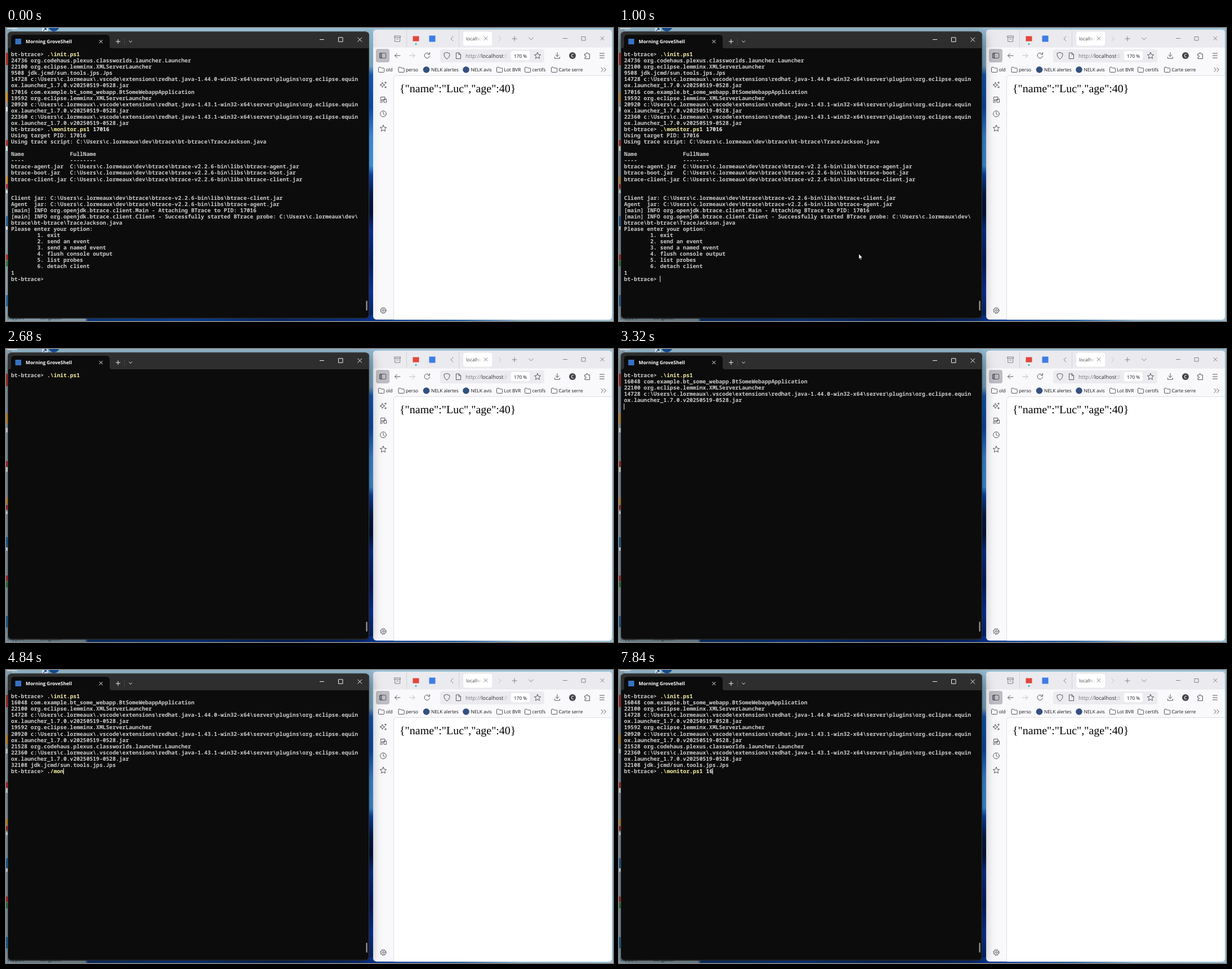
Write an HTML page that moves like this. It is 1078 by 520 pixels and loops after 8 s.

```html
<!DOCTYPE html>
<html lang="en">
<head>
<meta charset="utf-8">
<title>Terminal session</title>
<style>
  html, body { margin: 0; width: 100%; height: 100%; overflow: hidden; background: #9cc1d6; }
  svg { display: block; }
  text { text-rendering: geometricPrecision; white-space: pre; font-family: "Open Sans", "Noto Sans", sans-serif; }
  .icon { fill: none; stroke: #55555e; stroke-width: 1; stroke-linecap: round; stroke-linejoin: round; }
  .frame { stroke: #74747c; stroke-width: .9; }
  .pale { stroke: #bcbcc2; }
  .light { fill: none; stroke: #f2f2f2; stroke-width: 1; }
  .label { font-size: 8.3px; fill: #15141a; }
  #screen text { font: 600 9.708px "Noto Sans Mono", "DejaVu Sans Mono", monospace; }
  #shade { filter: drop-shadow(0 5px 11px rgba(0, 0, 0, .5)); }
</style>
</head>
<body>
<svg width="1078" height="520" viewBox="0 0 1078 520">
  <defs>
    <linearGradient id="gap" x2="0" y2="1">
      <stop offset="0" stop-color="#97bdd4"/><stop offset=".13" stop-color="#7fa9c8"/>
      <stop offset=".16" stop-color="#145bbb"/><stop offset=".27" stop-color="#0b4bb0"/>
      <stop offset=".37" stop-color="#3d8ce0"/><stop offset=".47" stop-color="#3f96e4"/>
      <stop offset=".5" stop-color="#0a46ae"/><stop offset=".57" stop-color="#061a4a"/>
      <stop offset=".63" stop-color="#04123a"/><stop offset=".69" stop-color="#0a2f96"/>
      <stop offset=".8" stop-color="#051c66"/><stop offset=".9" stop-color="#0a34a4"/>
      <stop offset="1" stop-color="#06205e"/>
    </linearGradient>
    <linearGradient id="floor">
      <stop offset="0" stop-color="#8fa7b5"/><stop offset=".13" stop-color="#8fa7b5"/>
      <stop offset=".135" stop-color="#0d3b82"/><stop offset=".3" stop-color="#0a429c"/>
      <stop offset=".45" stop-color="#082a70"/><stop offset=".6" stop-color="#0a3594"/>
      <stop offset=".75" stop-color="#2360a4"/><stop offset=".85" stop-color="#8db0c6"/>
      <stop offset="1" stop-color="#9cc1d6"/>
    </linearGradient>
    <linearGradient id="fadeTab"><stop stop-color="#fff" stop-opacity="0"/><stop offset="1" stop-color="#fff"/></linearGradient>
    <linearGradient id="fadeUrl"><stop stop-color="#ececf0" stop-opacity="0"/><stop offset="1" stop-color="#ececf0"/></linearGradient>
    <path id="star" d="M0-5.6 1.7-1.9 5.6-1.5 2.7 1.2 3.5 5.2 0 3.1-3.5 5.2-2.7 1.2-5.6-1.5-1.7-1.9Z"/>
    <path id="folder" d="M.5 1.5q0-1 1-1h2.6l1.4 1.6h4.2q1 0 1 1v5.4q0 1-1 1h-8.2q-1 0-1-1z"/>
    <path id="cross" d="M-3-3 3 3M3-3-3 3"/>
    <path id="plus" d="M-4 0H4M0-4V4"/>
    <clipPath id="urlClip"><path d="M812 38h78v24h-78z"/></clipPath>
  </defs>

  <!-- Desktop -->
  <path fill="#9cc1d6" d="M0 0h1078v520H0z"/>
  <path fill="#8ca6b7" d="M0 0h10v520H0z"/>
  <path fill="url(#gap)" d="M636 0h24v520h-24z"/>
  <path fill="url(#floor)" d="M0 510h1078v10H0z"/>
  <path fill="#c22f26" d="M0 44h3v22H0zM0 199h3v10H0zM0 277h3v8H0zM0 402h3v10H0z"/>
  <path fill="#e09a2c" d="M0 114h3v18H0zM0 264h3v12H0z"/>
  <path fill="#2c8a45" d="M0 413h3v10H0z"/>
  <path fill="#1f6fb0" d="M0 334h3v20H0zM0 474h3v20H0z"/>
  <path fill="#eef2f5" d="M0 140h3v8H0zM0 210h3v8H0zM0 288h3v5H0zM0 352h3v6H0zM64 0h10v6H64zM2 0h18v1.5H2z"/>
  <path fill="none" stroke="#1c62b5" stroke-width="1.5" d="M66 5l5-4M68 .8h3.3V4"/>
  <circle cx="85" cy="-4" r="10" fill="#15539c"/>
  <text x="2" y="517" font-size="8" fill="#1b2630">Support</text>
  <text x="61" y="517" font-size="8" fill="#1b2630">Songbook</text>

  <!-- Browser -->
  <rect x="652" y="3" width="424" height="514.5" rx="6" fill="#f9f9fb"/>
  <path fill="#eaeaef" d="M652 34.5V9q0-6 6-6h412q6 0 6 6v25.5z"/>
  <path fill="#fff" d="M689 517.5V89q0-4 4-4h383v426.5q0 6-6 6z"/>
  <path fill="none" stroke="#dedee4" d="M688.5 517V89q0-4.5 4.5-4.5h383"/>
  <path stroke="#d2d2d8" d="M711.5 4v30M804.5 4v30"/>
  <rect x="811.5" y="6" width="52.5" height="26" rx="4" fill="#fff" stroke="#dcdce2" stroke-width=".6"/>
  <text class="label" x="817" y="22" style="fill:#45454d">localho</text>
  <path fill="url(#fadeTab)" d="M834 10h11v18h-11z"/>
  <rect x="722.5" y="14.5" width="11" height="9" fill="#e2463a"/>
  <circle cx="728" cy="28.5" r="1.4" fill="#2ab39a"/>
  <rect x="751.5" y="13.5" width="11" height="11" fill="#3c7de6"/>
  <g class="icon frame">
    <path d="M690 14h10.5v2.5H690zM690.7 16.5v7.5h9v-7.5M693.5 19.5h3.5"/>
    <path d="M794 15l-4 4 4 4M928.5 17l4 4 4-4"/>
    <path class="pale" d="M875 15l4 4-4 4"/>
    <use href="#cross" x="852" y="18.5"/>
    <use href="#plus" x="903" y="19"/>
    <path d="M989.5 18.5h7M1022.5 15.5h6.5v6.5h-6.5z"/>
    <use href="#cross" x="1059" y="18.5"/>
  </g>

  <rect x="657" y="37" width="24" height="24" rx="4" fill="#bdbdc3"/>
  <rect x="771" y="38" width="185" height="23" rx="4" fill="#ececf0"/>
  <rect x="897" y="41" width="33" height="16" rx="3" fill="#fff"/>
  <g class="icon">
    <rect x="663.7" y="44.5" width="11" height="9" rx="1.5"/>
    <path fill="#8a8a92" d="M664 45.5h3v7h-3z"/>
    <path d="M700 49h-9.5M694.5 45l-4 4 4 4"/>
    <path class="pale" d="M716.5 49h9.5M722 45l4 4-4 4"/>
    <path d="M751.3 45.7a4.7 4.7 0 1 0 1.2 4M752.5 43.5v3.3h-3.3"/>
    <path d="M783 43.5l5 1.8q.3 6.7-5 9.7-5.3-3-5-9.7z"/>
    <path d="M799.8 44h4.7l3 3v7.5h-7.7zM804.3 44v3.2h3.2"/>
    <use href="#star" x="944" y="49"/>
    <path d="M979 43.5v7M976 47.7l3 3 3-3M974.5 51.5v2.5h9v-2.5"/>
    <path d="M1028 46h2.5q-.5-2.5 1.3-2.5t1.4 2.5h3.3v8.5H1028v-2.7q2.6.4 2.6-1.4T1028 49z"/>
    <path d="M1054.5 45h8M1054.5 49h8M1054.5 53h8"/>
  </g>
  <circle cx="1006" cy="49" r="6" fill="#45454d"/>
  <text x="1006" y="52" font-size="8" font-weight="600" fill="#fff" text-anchor="middle">C</text>
  <g clip-path="url(#urlClip)">
    <text x="816" y="53" font-size="9.5" fill="#333"><tspan fill="#777780">http://</tspan>localhost<tspan fill="#777780">:8</tspan></text>
  </g>
  <path fill="url(#fadeUrl)" d="M881 42h11v16h-11z"/>
  <text class="label" x="913.5" y="52.5" text-anchor="middle">170 %</text>

  <g id="bookmarks"></g>
  <path class="icon" d="M1057 70.5l3.5 3.5-3.5 3.5M1062 70.5l3.5 3.5-3.5 3.5"/>

  <g class="icon">
    <path d="M668.5 96.5l1.3 3.2 3.2 1.3-3.2 1.3-1.3 3.2-1.3-3.2L664 101l3.2-1.3zM674 95.5v3M672.5 97h3M674 103.5v3M672.5 105h3"/>
    <path d="M666 122.5h7v5h-7zM664.5 129.5h5M671.5 126h4v6h-4zM664.5 132h4"/>
    <circle cx="670" cy="152.3" r="5.3"/><path d="M670 149v3.5l2.4 1.5"/>
    <use href="#star" x="670" y="178"/>
    <circle cx="670" cy="501.3" r="1.7"/><circle cx="670" cy="501.3" r="4.3"/>
    <circle cx="670" cy="501.3" r="5.2" stroke-linecap="butt" stroke-dasharray="2.042"/>
  </g>
  <text x="699" y="113.6" font-size="20" style="font-family:'Liberation Serif',serif">{"name":"Luc","age":40}</text>

  <!-- Terminal -->
  <rect id="shade" x="3" y="6.5" width="642" height="509" rx="7" fill="#0c0c0c"/>
  <rect x="3" y="6.5" width="642" height="509" rx="7" fill="#0c0c0c"/>
  <path fill="#2e2e2e" d="M3 36V13.5q0-7 7-7h628q7 0 7 7V36z"/>
  <path fill="#0c0c0c" d="M5 36q4 0 4-4V18q0-6 6-6h163q6 0 6 6v14q0 4 4 4z"/>
  <rect x="3.5" y="7" width="641" height="508" rx="6.5" fill="none" stroke="#444" stroke-width=".8"/>
  <rect x="16.5" y="19" width="10.5" height="10" fill="#3672c4"/>
  <text x="35" y="27.2" font-size="8.4" font-weight="700" fill="#fff">Morning GroveShell</text>
  <g class="light">
    <use href="#cross" x="168.5" y="24"/>
    <use href="#plus" x="199" y="24"/>
    <path d="M218.5 22.7l2.7 2.6 2.7-2.6M557 20.5h8M590.5 16.8h7.5v7.5h-7.5z"/>
    <path stroke="#454545" d="M210.5 18v12"/>
    <path d="M624.5 16.8l7.6 7.6M632.1 16.8l-7.6 7.6"/>
  </g>
  <rect x="639.5" y="484" width="2.2" height="17.5" rx="1" fill="#9c9c9c"/>
  <g id="screen" xml:space="preserve"></g>
  <rect id="caret" width="1" height="11.07" fill="#f2f2f2"/>
  <path id="mouse" d="M0 0v9.2l2.1-2 1.5 3.3 1.4-.6-1.5-3.2h3z" fill="#fff" stroke="#000" stroke-width=".5"/>
</svg>

<script>
const LOOP = 8000, LEFT = 9, TOP = 41.3, CELL = 5.825, ROW = 11.07;
const $ = id => document.getElementById(id);

function add(parent, tag, attrs, text) {
  const el = document.createElementNS('http://www.w3.org/2000/svg', tag);
  for (const key in attrs) el.setAttribute(key, attrs[key]);
  if (text) el.textContent = text;
  return parent.appendChild(el);
}

// Bookmarks: x of the icon, label, round site icon or folder
[[661, 'old'], [696.5, 'perso'], [740.5, 'NELK alertes', 1], [811, 'NELK avis', 1],
 [871, 'Lot BVR'], [921, 'certifs'], [968, 'Carte serre']].forEach(([x, name, site]) => {
  const bar = $('bookmarks');
  if (site) add(bar, 'circle', { cx: x + 6, cy: 74, r: 5.8, fill: '#34507f' });
  else add(bar, 'use', { href: '#folder', x, y: 69, class: 'icon' });
  add(bar, 'text', { x: x + (site ? 14.5 : 13.5), y: 77.3, class: 'label' }, name);
});

// Terminal contents
const PROMPT = 'bt-btrace> ';
const HOME = String.raw`C:\Users\c.lormeaux\dev\btrace` + '\\';
const LIBS = HOME + String.raw`btrace-v2.2.6-bin\libs` + '\\';
const MONITOR = PROMPT + String.raw`.\monitor.ps1`;
const INIT = PROMPT + String.raw`.\init.ps1`;
const wrap = lines => lines.flatMap(s => s.match(/.{1,106}/g) || ['']);
const plugin = (pid, version) => pid + String.raw` c:\Users\c.lormeaux\.vscode\extensions\redhat.java-` + version +
  String.raw`-win32-x64\server\plugins\org.eclipse.equinox.launcher_1.7.0.v20250519-0528.jar`;
const xml = pid => pid + ' org.eclipse.lemminx.XMLServerLauncher';
const webapp = pid => pid + ' com.example.bt_some_webapp.BtSomeWebappApplication';
const maven = pid => pid + ' org.codehaus.plexus.classworlds.launcher.Launcher';
const jps = pid => pid + ' jdk.jcmd/sun.tools.jps.Jps';
const jar = part => `btrace-${part}.jar`;

const before = wrap([
  INIT, maven(24736), xml(22100), jps(9508), plugin(14728, '1.44.0'), webapp(17016), xml(19592),
  plugin(20920, '1.43.1'), plugin(22360, '1.43.1'), MONITOR + ' 17016',
  'Using target PID: 17016', `Using trace script: ${HOME}bt-btrace\\TraceJackson.java`, '',
  'Name'.padEnd(18) + 'FullName', '----'.padEnd(18) + '--------',
  ...['agent', 'boot', 'client'].map(p => jar(p).padEnd(18) + LIBS + jar(p)), '', '',
  'Client jar: ' + LIBS + jar('client'), 'Agent  jar: ' + LIBS + jar('agent'),
  '[main] INFO org.openjdk.btrace.client.Main - Attaching BTrace to PID: 17016',
  `[main] INFO org.openjdk.btrace.client.Client - Successfully started BTrace probe: ${HOME}bt-btrace\\TraceJackson.java`,
  'Please enter your option:',
  ...['exit', 'send an event', 'send a named event', 'flush console output', 'list probes', 'detach client']
    .map((s, i) => `        ${i + 1}. ${s}`),
  '1', PROMPT
]);
const listing = wrap([
  INIT, webapp(16048), xml(22100), plugin(14728, '1.44.0'), xml(19592), plugin(20920, '1.43.1'),
  maven(21528), plugin(22360, '1.43.1'), jps(32108)
]);
const shown = n => [...listing.slice(0, n), ''];
const typed = line => [...listing, line];
const dots = PROMPT + './';

// Time, rows, caret strength; the caret sits at the end of the last row
const steps = [
  [0, before, 0], [1000, before, 1],
  [1400, [...Array(36).fill(''), ' '.repeat(11)], 1], [1480, [PROMPT], 1],
  [1880, [MONITOR + ' 17016'], 1], [2080, [INIT], 1],
  [2680, [INIT], 0], [2760, shown(1), 1],
  [3320, shown(5), 1], [3400, shown(8), 1], [3480, shown(11), 1], [3520, shown(12), 1],
  [3600, typed(PROMPT), 1], [4000, typed(PROMPT), .5], [4040, typed(PROMPT), 0],
  [4200, typed(PROMPT + '.'), 1], [4320, typed(dots), 1],
  [4520, typed(dots + 'm'), 1], [4680, typed(dots + 'mo'), 1], [4840, typed(dots + 'mon'), 1],
  [5200, typed(MONITOR), 0], [5280, typed(MONITOR), 1], [5800, typed(MONITOR + ' '), 1],
  [6440, typed(MONITOR + ' '), 0], [6960, typed(MONITOR + ' '), 1],
  [7400, typed(MONITOR + ' 1'), 0], [7440, typed(MONITOR + ' 1'), 1], [7840, typed(MONITOR + ' 16'), 1]
];
const pointer = [
  [0], [80, 924, 498], [120, 880, 487], [160, 790, 460], [200, 660, 428],
  [240, 540, 405], [320, 455, 394], [400, 432, 397], [520, 426, 401], [1400]
];
const shadow = [[0, .3], [840, .65], [920, 1]];

const at = (table, t) => table.findLast(step => step[0] <= t);

function drawRow(text, row) {
  const command = text.match(/^(bt-btrace> )(\S*)(.*)$/);
  const parts = command ? command.slice(1) : [text];
  const colors = ['#cccccc', '#f9f1a5', '#f2f2f2'];
  let col = 0;
  parts.forEach((part, i) => {
    if (part.trim()) {
      add($('screen'), 'text', { x: LEFT + col * CELL, y: TOP + 8.8 + row * ROW, fill: colors[i] }, part);
    }
    col += part.length;
  });
}

let current;
function frame(now) {
  const t = now % LOOP;
  const step = at(steps, t);
  if (step !== current) {
    current = step;
    const [, rows, strength] = step;
    $('screen').replaceChildren();
    rows.forEach(drawRow);
    const last = rows.length - 1;
    $('caret').setAttribute('x', LEFT - .5 + rows[last].length * CELL);
    $('caret').setAttribute('y', TOP + last * ROW);
    $('caret').setAttribute('opacity', strength);
  }
  const [, x, y] = at(pointer, t);
  $('mouse').setAttribute('visibility', x ? 'visible' : 'hidden');
  if (x) $('mouse').setAttribute('transform', `translate(${x} ${y})`);
  $('shade').setAttribute('opacity', at(shadow, t)[1]);
}

function loop() {
  frame(performance.now());
  requestAnimationFrame(loop);
}
loop();
</script>
</body>
</html>
```
